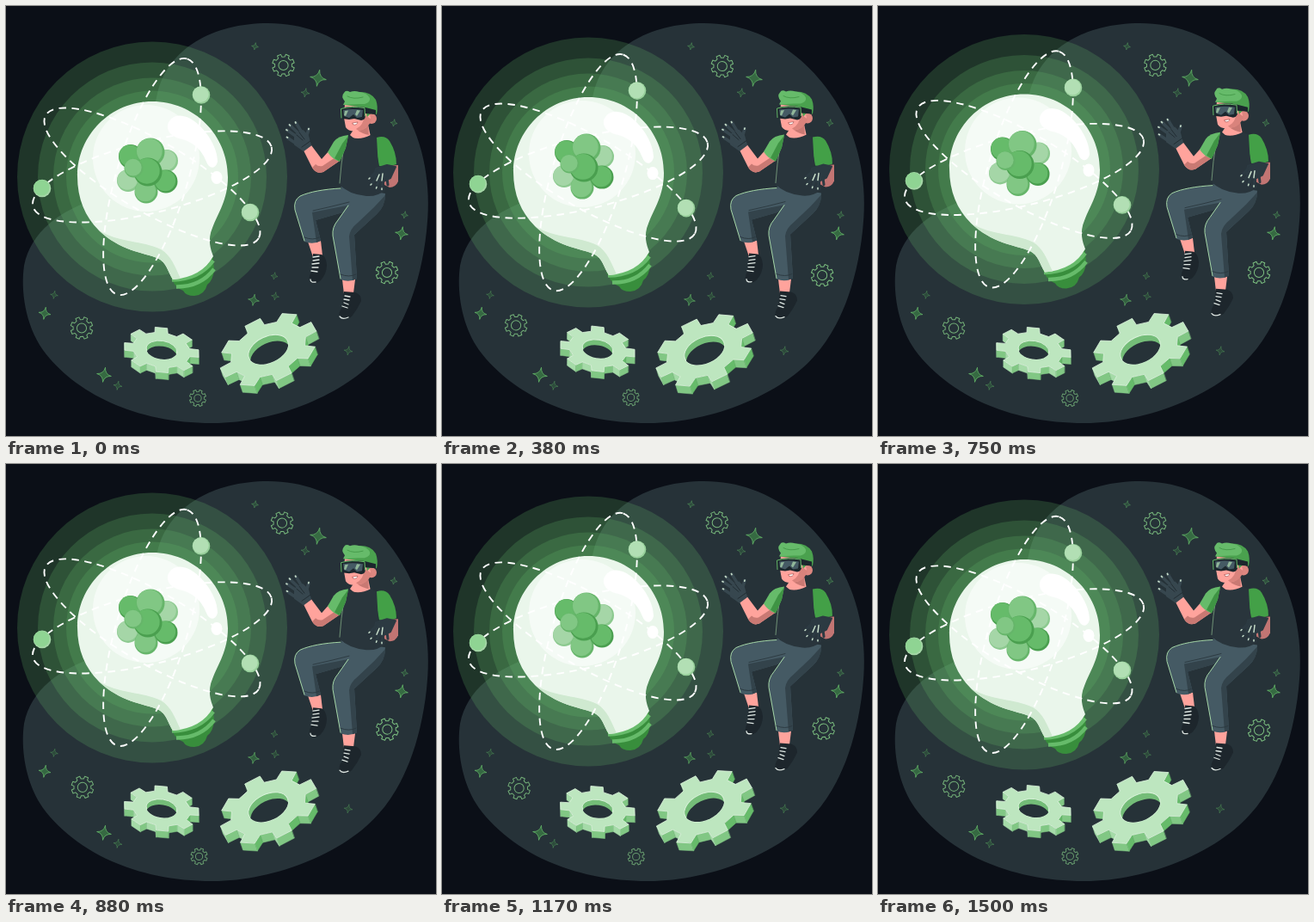
These frames come from a looping animation (500x500 px, 1.54 s). An HTML page:

```html
<!DOCTYPE html>
<html lang="en">
<head>
<meta charset="utf-8">
<title>Bright idea</title>
<style>
html, body { margin: 0; width: 100%; height: 100%; overflow: hidden; background: #0b0f17; }
svg { display: block; width: 100vw; height: 100vh; }
</style>
</head>
<body>
<svg viewBox="0 0 500 500" stroke-linejoin="round" stroke-linecap="round">
  <path fill="#263238" d="M305 20C385 20 440 75 467 127C490 172 494 220 489 262C482 325 462 375 433 407C396 450 315 485 240 485C150 485 80 450 43 400C22 370 17 330 21 302C29 262 62 238 110 222C160 205 165 150 176 102C188 50 240 20 305 20Z"/>
  <g id="stars"></g>

  <g id="bulb">
    <g id="glow" fill="#66bb6a" fill-opacity=".22"></g>
    <path fill="#388e3c" d="M191 315L240 288L242 306Q241 319 234 324Q231 336 219 337Q209 337 206 331Q196 327 194 319Z"/>
    <g fill="none" stroke="#66bb6a" stroke-width="4.5" stroke-linecap="butt">
      <path d="M193 318.500Q225 318 241 296"/>
      <path d="M198 326.500Q226 327 242 306"/>
    </g>
    <path fill="#eaf6eb" d="M170 111C219 111 258 150 258 199C258 225 247 240 240 258C234 272 238 283 241 291Q228 315 194 318C188 309 187 298 176 293C160 287 132 284 108 261C92 245 83 224 83 198C83 150 122 111 170 111Z"/>
    <path fill="#cfe9d0" d="M108 261C130 275 160 273 180 283C192 290 196 302 203 317L194 318C188 309 187 298 176 293C160 287 132 284 108 261Z"/>
    <circle cx="163" cy="177" r="62" fill="#fff" fill-opacity=".55"/>
    <path fill="#fff" d="M188 138C192 126 205 124 219 134C235 146 246 166 246 181C244 190 236 190 233 181C226 164 215 157 201 154C192 151 187 146 188 138Z"/>
    <ellipse cx="245" cy="199.500" rx="6.500" ry="7.500" fill="#fff"/>
    <g id="orbits" fill="none" stroke="#fff" stroke-width="1.900" stroke-dasharray="8.500 6.500" stroke-linecap="butt"></g>
    <g id="balls"></g>
  </g>

  <g id="swing" fill="none" stroke="#81c784"></g>
  <g id="cogs"></g>

  <g id="person">
    <!-- far arm -->
    <path fill="#c27573" d="M439 186L456 185L456 204Q453 211 446 211L440 208Z"/>
    <path fill="#43a047" d="M431 153Q441 150 446 157Q454 170 454 184Q445 188 434 186L431 170Z"/>
    <!-- legs -->
    <path fill="#ffa39c" d="M351 274L366 273L368 290L357 292Z"/>
    <path fill="#ffa39c" d="M391 318L406 318L404 334L393 335Z"/>
    <path fill="#455a64" d="M389 212C370 213 353 216 342 221Q334 226 336 237L347 274Q357 278 366 273L360 249L405 236L425 214Z"/>
    <path fill="#33434b" d="M356 240Q375 236 397 232L392 240L360 249L366 273L361 275Z"/>
    <path fill="#455a64" d="M389 210L441 218Q441 233 431 242L405 266L408 317Q399 322 389 318L380 267Q379 257 386 249L402 225Z"/>
    <path fill="#33434b" d="M441 220Q441 233 431 242L405 266L408 317L403 319L399 268Q400 259 409 252L428 234Z"/>
    <g fill="none" stroke="#a5d6a7" stroke-width="1">
      <path d="M389 212C370 213 353 216 342 221Q334 226 336 237L347 273"/>
      <path d="M398 232L386 249Q379 257 380 267L389 317"/>
    </g>
    <path fill="none" stroke="#2b383f" stroke-width=".9" d="M347 269Q357 273 364 269M389 312Q399 316 407 312M357 238Q380 233 399 228"/>
    <!-- shoes -->
    <path id="shoe" fill="#1d262c" d="M357 288L367 289Q372 291 373 301Q373 311 366 319Q359 325 354 321Q351 317 355 309Z"/>
    <path fill="#1d262c" d="M393 332L406 333Q413 335 413 343Q409 352 402 361Q393 367 388 362Q386 357 391 350Z"/>
    <path fill="none" stroke="#dfe8e4" stroke-width="1.300" d="M357 292L364 291M357 296L364 295M356 300L364 299M356 304L363 304M355 308L362 309M394 337L400 338M393 341L399 342M393 345L398 347M391 349L397 351M354 318Q354 322 360 321M388 361Q391 365 398 362"/>
    <!-- torso -->
    <path fill="#ffa39c" d="M406 141L421 138L424 152Q416 158 408 157L400 150Z"/>
    <path fill="#c97973" d="M408 144L421 138L422 150Q415 149 408 144Z"/>
    <path fill="#29353c" d="M397 150Q408 158 424 150L431 153L433 188L441 214Q432 222 419 221Q398 219 387 207L390 180L389 160Z"/>
    <path fill="none" stroke="#80a883" stroke-width=".8" d="M393 163L390 184L388 206"/>
    <!-- near arm -->
    <path fill="#ffa39c" d="M375 169L367 178L355 162L346 168L356 188Q361 196 369 193L388 180Z"/>
    <path fill="#c97973" d="M356 188Q361 196 369 193L388 180L383 176L368 186Q363 187 360 184Z"/>
    <path fill="#66bb6a" d="M398 150Q386 151 381 158L374 170Q379 178 388 181L395 165Z"/>
    <path fill="#3f9444" d="M398 151L395 165L388 181L382 177L391 160Z"/>
    <g stroke="#37474f" stroke-width="3.600" fill="#37474f">
      <path d="M336 159L327 153M338 152L326.500 144M340 148L330 138.500M344 147L337 135.500M350 150L352 143"/>
      <path stroke-width="2" d="M336 150L345 145L351 151L354 162L346 168L336 161Z"/>
    </g>
    <path fill="none" stroke="#c9dfcb" stroke-width="1.700" d="M326 144L327 144.500M329.500 138L330.500 139M336.500 135L337 136M352 142.500L351.800 143.500M326.500 152.500L327.500 153"/>
    <path fill="none" stroke="#1e282d" stroke-width=".8" d="M338 150L345 156M341 147L347 155M344 164L354 157"/>
    <!-- far hand -->
    <g stroke="#2c3a42" fill="#2c3a42" stroke-width="3">
      <path stroke-width="2" d="M430 189L443 185L453 187L447 200L437 205L428 199Z"/>
      <path d="M429 194L422 201M431 200L424 208M434 202L430 212M438 202L437 213M443 200L444 208"/>
    </g>
    <path fill="none" stroke="#c9dfcb" stroke-width="1.500" d="M422 201L423 200M424 208L425 207M430.500 212L431 210.500M437 213.500L437 212M434 196L431 203M438 195L437 203"/>
    <!-- head -->
    <circle cx="425" cy="131" r="6" fill="#dd8780"/>
    <path fill="#ffa39c" d="M394 113L420 110L424 131Q422 143 410 145Q399 147 395 141L393 130Z"/>
    <path fill="#d9837c" d="M417 126L425 132Q421 144 410 145L407 143Q416 139 417 126Z"/>
    <path fill="#4aa14e" d="M409 100Q424 99 430 109Q433 117 431 126L424 125L420 129L417 118L393 115Z"/>
    <path fill="#66bb6a" d="M394 111Q389 105 393 101Q395 97 400 100Q405 98 411 100Q420 101 423 107Q424 112 417 114L409 114L392 115Z"/>
    <path fill="none" stroke="#3f9444" stroke-width=".8" d="M397 105Q404 109 415 106"/>
    <path fill="#1c272d" d="M389 119Q402 115 418 118L430 121V126L418 125Q419 132 413 133L405 131L399 132L391 131Q388 125 389 119Z"/>
    <path fill="#455a64" d="M392 121Q403 119 415 121L414 129L408 130L404 126L399 130L393 128Z"/>
    <path fill="#91b79a" d="M394 122L398 121.500L395 128L393 127ZM408 121L412 121.500L408 128L406 126Z"/>
    <path fill="none" stroke="#66bb6a" stroke-width="1" d="M390 130L389.500 119.500Q402 116 417 118.500L417.500 128"/>
    <path fill="#fff" stroke="#a9544f" stroke-width=".7" d="M403 136L409 135Q408 139 404 138Z"/>
  </g>
</svg>
<script>
const LOOP = 1540;
const $ = id => document.getElementById(id);
const put = (box, tag, attrs) => {
  const el = document.createElementNS('http://www.w3.org/2000/svg', tag);
  for (const k in attrs) el.setAttribute(k, attrs[k]);
  return box.appendChild(el);
};
const path = pts => 'M' + pts.map(p => p.map(v => v.toFixed(2))).join('L') + 'Z';

// toothed unit wheel, with its teeth turned by phase degrees
function wheel(teeth, root, phase) {
  const pts = [], pitch = 2 * Math.PI / teeth;
  for (let i = 0; i < teeth; i++)
    for (const [at, r] of [[-.29, root], [-.21, 1], [.21, 1], [.29, root]]) {
      const a = (i + at) * pitch + phase * Math.PI / 180;
      pts.push([r * Math.cos(a), r * Math.sin(a)]);
    }
  return pts;
}

function star([x, y, r, opacity]) {
  const q = r * .1;
  put($('stars'), 'path', {
    d: `M0 ${-r}Q${q} ${-q} ${r} 0Q${q} ${q} 0 ${r}Q${-q} ${q} ${-r} 0Q${-q} ${-q} 0 ${-r}Z`,
    transform: `translate(${x} ${y}) rotate(10)`, fill: '#4caf50', 'fill-opacity': opacity * .45,
    stroke: '#66bb6a', 'stroke-width': .7, 'stroke-opacity': opacity
  });
}

function ball([x, y, r, light, dark]) {
  put($('balls'), 'circle', { cx: x, cy: y, r, fill: dark });
  put($('balls'), 'circle', { cx: x - r * .07, cy: y - r * .07, r: r * .9, fill: light });
}

function smallGear([x, y, r, opacity]) {
  const g = put($('swing'), 'g', { transform: `translate(${x} ${y})`, 'stroke-opacity': opacity });
  put(g, 'path', { d: path(wheel(8, .77, 22).map(p => p.map(v => v * r))) });
  put(g, 'circle', { r: r * .43 });
}

// tilted wheel with thickness (dx, dy)
function solidGear(id, x, y, a, b, tilt, phase, dx, dy) {
  const c = Math.cos(tilt * Math.PI / 180), s = Math.sin(tilt * Math.PI / 180);
  const rim = wheel(8, .77, phase).map(([u, v]) => [x + u * a * c - v * b * s, y + u * a * s + v * b * c]);
  const low = p => [p[0] + dx, p[1] + dy];
  const g = put($('cogs'), 'g', {});
  const sides = rim.map((p, i) => [p, rim[(i + 1) % rim.length]])
    .sort((m, n) => m[0][1] + m[1][1] - n[0][1] - n[1][1]);
  for (const [p, q] of sides) {
    const nx = q[1] - p[1], ny = p[0] - q[0];
    if (nx * dx + ny * dy <= 0) continue;
    const fill = nx > Math.abs(ny) * .6 ? '#66bb6a' : nx > -ny * .2 ? '#81c784' : '#a5dba8';
    put(g, 'path', { d: path([p, q, low(q), low(p)]), fill, stroke: fill, 'stroke-width': .5 });
  }
  put(g, 'path', { d: path(rim), fill: '#bde6bf', stroke: '#dcf3dd', 'stroke-width': .8 });
  const hole = { cx: x, cy: y, rx: a * .41, ry: b * .41, transform: `rotate(${tilt} ${x} ${y})` };
  put(put(g, 'clipPath', { id }), 'ellipse', hole);
  put(g, 'ellipse', { ...hole, fill: '#74bd78', stroke: '#dcf3dd', 'stroke-width': .9 });
  const inner = put(g, 'g', { 'clip-path': `url(#${id})` });
  put(put(inner, 'g', { transform: `translate(${dx * .8} ${dy * .8})` }), 'ellipse', { ...hole, fill: '#263238' });
}

[[289.5, 47, 4, .5], [363, 84, 9.5, 1], [348, 101, 5, .45], [451, 136, 4, .5], [463.5, 243, 4, .5],
 [460, 264.5, 7.5, 1], [312, 314, 4, .4], [313, 337.5, 4.5, .4], [288, 342, 6.5, .8], [398, 401, 5, .4],
 [45, 357.5, 7, .95], [56, 336, 4.5, .4], [114, 429, 8.5, 1], [130, 441.5, 5, .45]].forEach(star);

for (const r of [157, 133, 115, 100]) put($('glow'), 'circle', { cx: 170, cy: 198.5, r });
for (const turn of [30, -73.5, -14])
  put($('orbits'), 'ellipse', { rx: 143, ry: 41.5, transform: `translate(170 198.5) rotate(${turn})` });

const pale = ['#a5d6a7', '#8cc98f'], mid = ['#81c784', '#66b56a'], deep = ['#66bb6a', '#4a9f4f'];
[[145, 175, 14, ...deep], [187, 180, 13, ...pale], [142, 203, 13, ...pale], [163, 216, 13.5, ...mid],
 [186, 204, 13.5, ...deep], [168, 170, 16.5, ...mid], [165, 193, 16.5, ...deep], [148.5, 188.5, 11, ...mid],
 [227, 103.5, 10.3, '#b2dfb4', '#98d09b'], [42, 212, 10.3, '#8fd493', '#a5d6a7'],
 [284, 240, 10.3, '#b2dfb4', '#98d09b']].forEach(ball);

[[322.5, 69, 13, .9], [88, 374.5, 13, .85], [443, 310, 13, .95], [223, 456, 9.7, .7]].forEach(smallGear);
solidGear('hole1', 181, 400, 44, 26, 9, -6, 0, 8);
solidGear('hole2', 305, 399.5, 60, 37, -25, -3, 3, 9);

// [time, value] steps
const bulbY = [[0, 0], [200, -2.4], [380, -4.9], [630, -8.1], [755, -8.6], [880, -8.1], [1040, -5.9], [1290, -2.4], [1500, -.1], [LOOP, 0]];
const personY = [[0, 0], [200, .2], [380, -.4], [630, -2], [880, -4.8], [1040, -6.6], [1290, -8.2], [1500, -7.5], [LOOP, -7.2]];
const turn = [[0, 0], [200, .78], [330, 1.02], [380, 1], [500, .75], [630, .35], [880, -.45], [1040, -.87], [1100, -.9], [1290, -.65], [1500, -.1], [LOOP, 0]];

function at(steps, t) {
  const i = steps.findIndex(s => s[0] > t);
  const [t0, v0] = steps[i - 1], [t1, v1] = steps[i];
  return v0 + (v1 - v0) * (t - t0) / (t1 - t0);
}

const start = performance.now();
function draw() {
  const t = (performance.now() - start) % LOOP;
  const move = (id, v) => $(id).setAttribute('transform', v);
  move('bulb', `translate(0 ${at(bulbY, t)})`);
  move('person', `translate(0 ${at(personY, t)})`);
  move('swing', `rotate(${at(turn, t)} 265.5 261)`);
  move('cogs', `rotate(${at(turn, t)} 251 404)`);
  requestAnimationFrame(draw);
}
draw();
</script>
</body>
</html>
```
